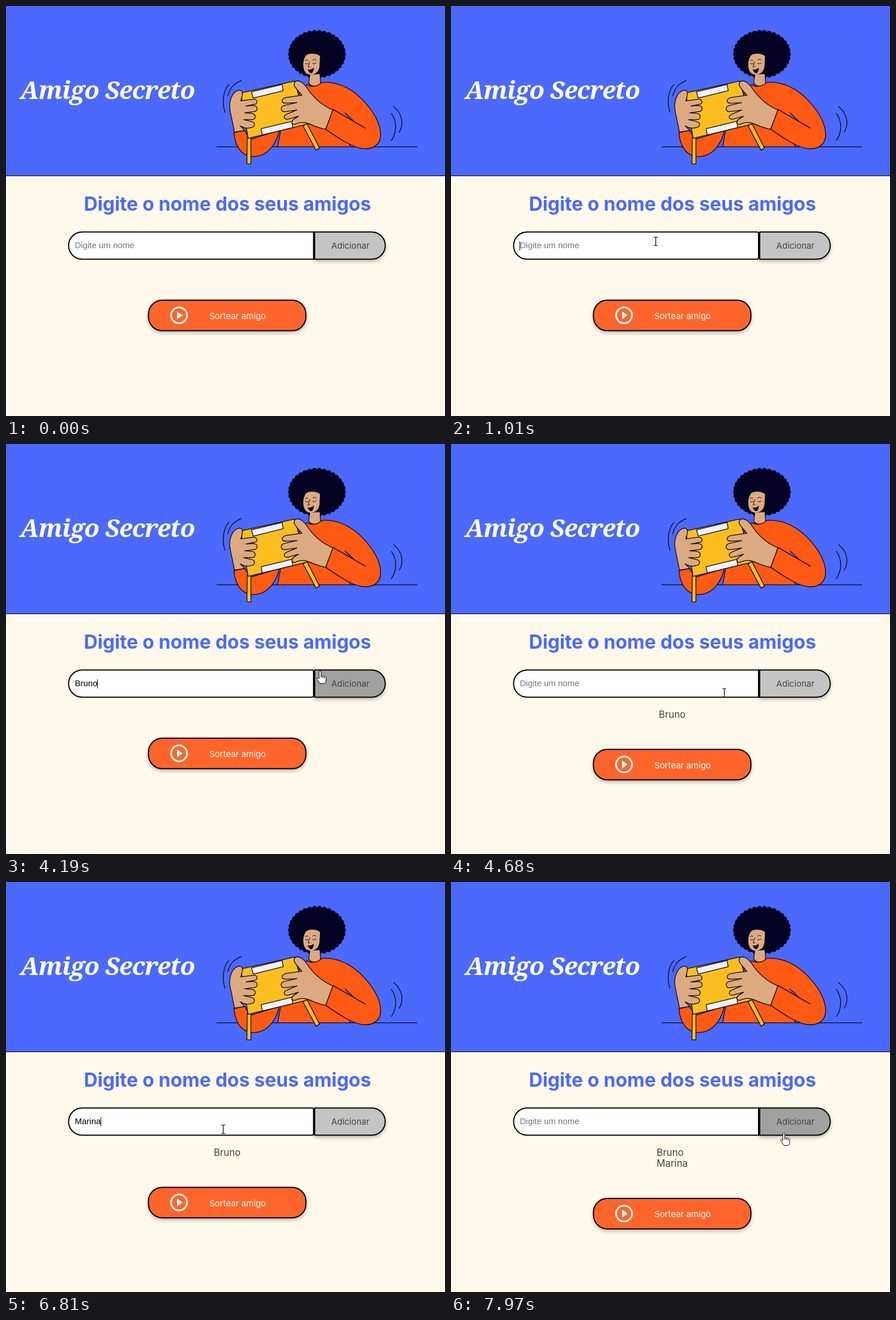
Animation, 775 px wide and 723 px high, one loop 8000 ms. Source, as an HTML page:

```html
<!DOCTYPE html>
<html lang="pt-BR">
<head>
<meta charset="utf-8">
<title>Amigo Secreto</title>
<style>
  html, body { margin: 0; width: 100%; height: 100%; overflow: hidden; background: #fff9eb; }
  svg { display: block; width: 775px; height: 723px; }
  text { font-family: Inter, sans-serif; font-size: 15px; font-optical-sizing: none; white-space: pre; }
  .title { font: italic 700 44px "Noto Serif", serif; letter-spacing: -0.95px; fill: #fff; }
  .heading { font-size: 33.6px; font-weight: 700; fill: #4b69fd; }
  .mid { text-anchor: middle; }
  .list text { font-size: 16.9px; fill: #444; }
  #field { font-family: "Liberation Sans", Arial, sans-serif; }
  .shadow { filter: drop-shadow(0 3px 3px rgba(0, 0, 0, .27)); }
  .box { stroke: #000; stroke-width: 2; }
  .art { stroke: #0a0612; stroke-width: 1.3; stroke-linejoin: round; stroke-linecap: round; fill: none; }
  .skin { fill: #dcaa80; }
  .shirt { fill: #ff5a14; }
  .gold { fill: #fcbe1f; }
  .label { fill: #f1f2f8; }
  .hair { fill: #030022; stroke: none; }
</style>
</head>
<body>
<svg viewBox="0 0 775 723">
  <rect width="775" height="299" fill="#4b69fd"/>
  <rect y="299" width="775" height="1" fill="#000"/>
  <text class="title" x="25" y="164">Amigo Secreto</text>

  <g class="art" transform="translate(.4 .4)">
    <path d="M372 248H725M393 138C382 150 381 172 386 187M415 131C403 136 395 143 391 158M684 177C700 190 702 208 694 222M680 189C690 203 690 222 680 237"/>
    <g class="hair" id="hair"><ellipse cx="548.5" cy="85" rx="47" ry="39"/></g>
    <path class="skin" d="M536 120L534 135C538 143 550 143 555 136L554 119Z"/>
    <path class="shirt" d="M531 138C536 142 548 143 556 135C563 133 569 134 575 135C600 139 620 153 638 175C654 194 661 212 661 228C660 246 646 253 628 251L606 243L608 248H479L487 205L520 150Z"/>
    <path class="skin" stroke="none" d="M529 87C523 95 522 113 531 119C541 124 552 117 553 106L554 88C548 83 535 82 529 87Z"/>
    <path stroke-width="1" d="M528 96Q531 93 533 96M541 95Q544 92 547 95M528 101Q530 103 533 101M541 101Q544 103 547 100M536 98L533 107H536"/>
    <path fill="#0a0612" stroke="none" d="M532 111Q538 113 543 108Q543 117 538 118Q534 117 532 111Z"/>
    <path class="shirt" d="M402 223L421 219L430 235L482 219C478 240 465 259 446 264C424 269 405 257 402 223Z"/>
    <path class="gold" d="M425.500 230L425 278H432V230ZM524 211L531 207L553 250L547 254Z"/>
    <path class="gold" d="M414 153L509 132L531 208L427 233Z"/>
    <path class="label" d="M433 151L487 138L489 149L436 162ZM450 216L504 203L506 214L452 227Z"/>
    <path class="skin" d="M403 222L396 188C391 169 399 150 411 148C419 148 418 155 414 167L436 164C444 163 445 173 438 173L423 176L437 175C446 177 444 186 436 186L421 188L434 189C442 191 441 200 433 200L419 200L432 203C441 205 440 213 432 214C426 216 420 215 413 211L421 219Z"/>
    <path class="skin" d="M577 183C560 176 545 163 535 150C527 137 518 128 510 133C504 139 514 147 522 157L494 161C485 163 485 171 493 171L513 170L491 175C483 177 484 187 492 186L513 183L496 190C488 193 490 201 498 199L516 194L508 199C501 204 505 211 513 207C530 200 540 213 564 217Z"/>
    <path class="shirt" stroke="none" d="M577 182L564 217C590 235 610 248 628 251L634 215Z"/>
    <path stroke="none" fill="#4b69fd" d="M598 188L600 194L614 203Z"/>
    <path d="M634 215L577 182L564 217C590 235 610 248 628 251M598 188L614 203"/>
  </g>

  <text class="heading mid" x="391" y="361">Digite o nome dos seus amigos</text>

  <path id="input" class="box" fill="#fff"/>
  <g class="shadow">
    <path id="add" class="box" d="M545 398.500H645.500A24 24 0 0 1 645.500 446.500H545Z"/>
  </g>
  <text class="mid" x="608" y="428" fill="#444">Adicionar</text>
  <text id="field" x="121.500" y="427"></text>
  <rect id="caret" y="415" width="1" height="16"/>

  <g class="list" id="list"><text y="482.500"></text><text y="502"></text></g>

  <g id="draw">
    <rect class="box shadow" id="drawBox" x="251.500" y="518.800" width="278" height="53.800" rx="24.500"/>
    <circle cx="305.500" cy="545.500" r="14" fill="none" stroke="#fff" stroke-width="3"/>
    <path d="M302 538.500L312 545.500L302 552.500Z" fill="#fff"/>
    <text x="359" y="552" fill="#fff">Sortear amigo</text>
  </g>

  <g id="cursor" stroke="#000" stroke-linejoin="round">
    <path id="arrow" fill="#fff" d="M0 0V16L4 12.500L6.500 18L9 17L6.500 11.500H11.500Z"/>
    <path id="beam" fill="none" stroke-width="1.200" d="M-3.500 -7H-1Q0 -7 0 -6Q0 -7 1 -7H3.500M0 -6V7M-3.500 8H-1Q0 8 0 7Q0 8 1 8H3.500"/>
    <path id="hand" fill="#fff" d="M-1.700 1.500a1.700 1.700 0 0 1 3.400 0V8.500q1.700 -1.500 3 .5q1.700 -1.200 3 .8q1.700 -.8 2.800 1.200V16q0 4 -2.500 6H0L-5.500 14q-.6 -2.800 1.600 -2.400L-1.700 13.500ZM1.700 8.500V12M4.700 9V12.500M7.700 10V13"/>
  </g>
</svg>
<script>
const $ = id => document.getElementById(id);
const LOOP = 8000, STEP = 70, ROW = 19.6;

const rounds = [
  { name: 'Bruno', focus: 870, keys: [1860, 2190, 2450, 2600, 2780], click: 4400 },
  { name: 'Marina', focus: 5090, keys: [5880, 6080, 6340, 6490, 6670, 6810], click: 7760 }
];

// Pointer path as time, x, y
const path = [
  [190, 687, 704], [330, 575, 645], [470, 447, 572], [600, 385, 512], [740, 358, 455],
  [870, 352, 410], [1009, 352, 410], [1010, 361, 414], [3770, 361, 414], [3910, 400, 412],
  [4190, 554, 400], [4330, 590, 422], [4470, 590, 424], [4610, 540, 435], [4680, 482, 438],
  [4830, 415, 437], [5020, 383, 435], [7270, 383, 435], [7410, 420, 434], [7620, 555, 438],
  [7760, 587, 442], [8000, 587, 442]
];
const starts = [190, 1010, 3840, 4680, 7340];

const hair = $('hair');
for (let i = 0; i < 34; i++) {
  const a = i / 34 * 2 * Math.PI;
  const c = document.createElementNS(hair.namespaceURI, 'circle');
  c.setAttribute('cx', 548.5 + 46.3 * Math.cos(a));
  c.setAttribute('cy', 84.5 + 38 * Math.sin(a));
  c.setAttribute('r', 4.7);
  hair.append(c);
}

const set = (el, name, value) => el.setAttribute(name, value);
const show = (el, on) => set(el, 'visibility', on ? 'visible' : 'hidden');
const within = (p, x0, y0, x1, y1) => p.x >= x0 && p.x <= x1 && p.y >= y0 && p.y <= y1;

function pointer(t) {
  const start = starts.filter(s => s <= t).pop();
  if (start === undefined) return null;
  t = start + Math.floor((t - start) / STEP) * STEP;
  const i = Math.max(1, path.findIndex(k => k[0] > t));
  const [a, b] = [path[i - 1], path[i]];
  const f = (t - a[0]) / (b[0] - a[0]);
  return { x: a[1] + (b[1] - a[1]) * f, y: a[2] + (b[2] - a[2]) * f };
}

function drawInput(t) {
  const round = rounds.find(r => t >= r.focus && t < r.click);
  const count = round ? round.keys.filter(k => k <= t).length : 0;
  const field = $('field');
  field.textContent = count ? round.name.slice(0, count) : 'Digite um nome';
  set(field, 'fill', count ? '#000' : '#757575');
  const right = round
    ? 'H540Q543 398.5 543 401.5V443.5Q543 446.5 540 446.5'
    : 'H543V446.5';
  set($('input'), 'd', `M134.5 398.5${right}H134.5A24 24 0 0 1 134.5 398.5Z`);
  const since = round ? t - (count ? round.keys[count - 1] : round.focus) : 0;
  show($('caret'), round && since % 1060 < 530);
  set($('caret'), 'x', Math.round(121 + (count ? field.getComputedTextLength() : 0)));
}

function drawList(t) {
  const added = rounds.filter(r => t >= r.click).length;
  const rows = [...$('list').children];
  rows.forEach((row, i) => row.textContent = i < added ? rounds[i].name : '');
  const width = Math.max(...rows.map(r => r.textContent ? r.getComputedTextLength() : 0));
  rows.forEach(row => set(row, 'x', 390.5 - width / 2));
  const shift = added * ROW;
  set($('draw'), 'transform', `translate(0 ${shift})`);
  return shift;
}

function drawPointer(t, shift) {
  const p = pointer(t);
  const onAdd = p && within(p, 544, 398, 671, 448);
  const onDraw = p && within(p, 251, 518 + shift, 531, 573 + shift);
  const onInput = p && within(p, 110, 398, 543, 448);
  set($('add'), 'fill', onAdd ? '#a1a1a1' : '#c4c4c4');
  set($('drawBox'), 'fill', onDraw ? '#e55720' : '#ff652b');
  show($('hand'), onAdd || onDraw);
  show($('beam'), onInput);
  show($('arrow'), p && !onAdd && !onDraw && !onInput);
  if (p) set($('cursor'), 'transform', `translate(${Math.round(p.x) + 0.5} ${Math.round(p.y) + 0.5})`);
}

function frame() {
  const t = performance.now() % LOOP;
  drawInput(t);
  drawPointer(t, drawList(t));
  requestAnimationFrame(frame);
}
frame();
</script>
</body>
</html>
```
